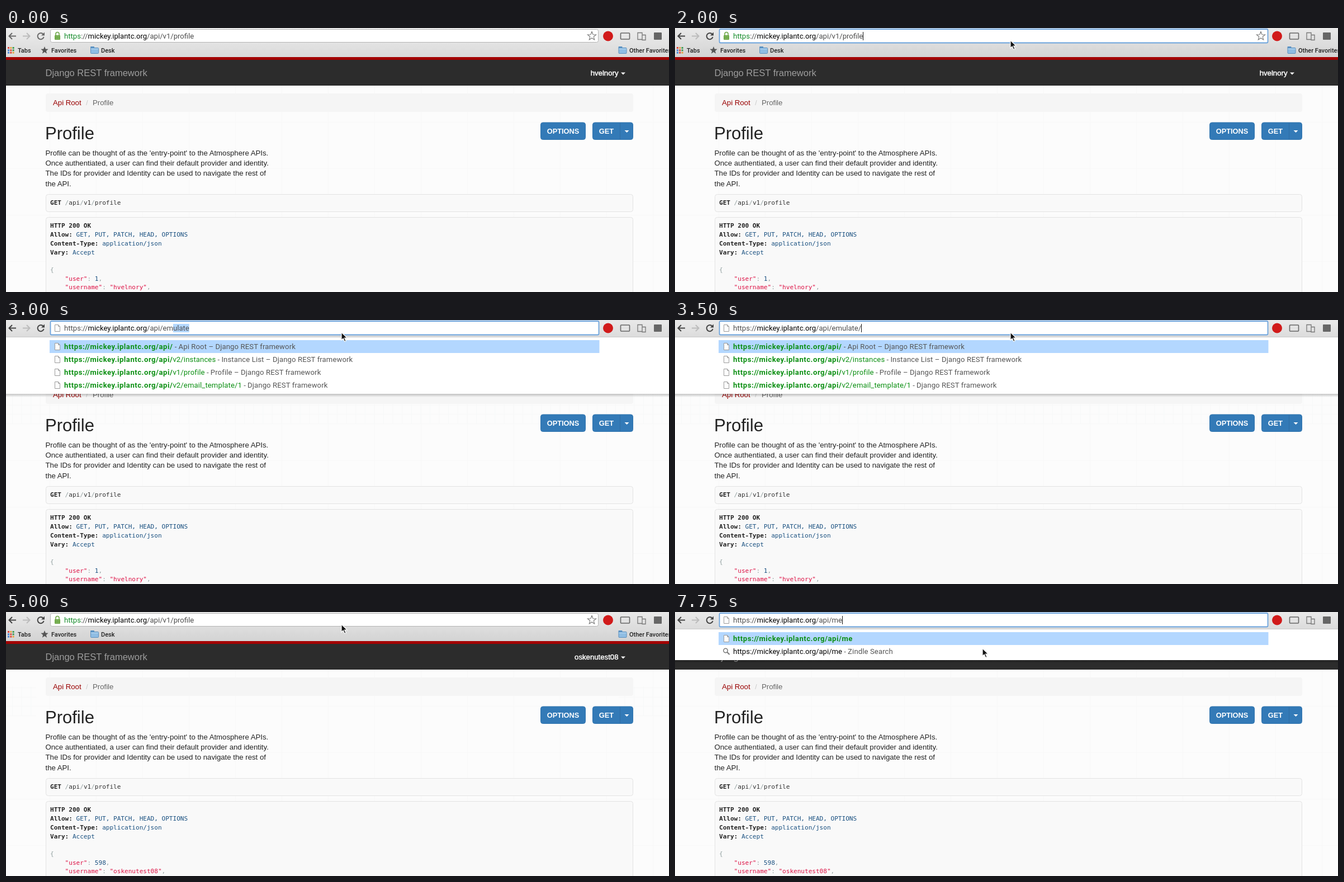
Write an HTML page that moves like this. It is 1186x472 px and loops after 8000 ms.

```html
<!DOCTYPE html>
<html lang="en">
<head>
<meta charset="utf-8">
<title>Profile</title>
<style>
html, body { margin: 0; width: 100%; height: 100%; overflow: hidden; background: #fcfcfc; }
svg { display: block; width: 1186px; height: 472px; }
text { white-space: pre; }
.page { font: 13.2px "Liberation Sans", Arial, sans-serif; }
.mono { font: 11.06px "DejaVu Sans Mono", monospace; }
.ui { font: 13.1px Roboto, sans-serif; }
.mark { font: 500 11px Roboto, sans-serif; }
.b { font-weight: 700; }
.ui .b { letter-spacing: .53px; }
.ui .note { letter-spacing: .12px; }
</style>
</head>
<body>
<svg id="stage" viewBox="0 0 1186 472"></svg>
<script>
const LOOP = 8000;
const SITE = 'https://mickey.iplantc.org';
const DRF = 'Django REST framework';
const NAME = 'oskenutest08';
const INK = '#222', BLUE = '#195080', RED = '#d14', PICK = '#b3d7ff';
const stage = document.getElementById('stage');
const ruler = document.createElement('canvas').getContext('2d');

// Drawing helpers
const rect = (x, y, w, h, fill, more = '') =>
  `<rect x="${x}" y="${y}" width="${w}" height="${h}" fill="${fill}" ${more}/>`;
const line = (d, color, width = 1, fill = 'none') =>
  `<path d="${d}" stroke="${color}" stroke-width="${width}" fill="${fill}"/>`;
const shape = (d, fill) => `<path d="${d}" fill="${fill}"/>`;
const span = (str, color, cls = '') => `<tspan fill="${color}" class="${cls}">${str}</tspan>`;
const text = (x, y, body, cls, fill = INK, more = '') =>
  `<text x="${x}" y="${y}" class="${cls}" fill="${fill}" ${more}>${body}</text>`;

function widthOf(str) {
  ruler.font = '13.1px Roboto, sans-serif';
  return ruler.measureText(str).width;
}

function star(cx, cy, r) {
  const pts = Array.from({ length: 10 }, (_, i) => {
    const a = i * Math.PI / 5 - Math.PI / 2, q = i % 2 ? r * .43 : r;
    return (cx + q * Math.cos(a)).toFixed(2) + ' ' + (cy + q * Math.sin(a)).toFixed(2);
  });
  return 'M' + pts.join('L') + 'Z';
}

// Suggestion rows: [bold path, plain path, description]
const apiRows = [
  ['/api/', '', 'Api Root – ' + DRF],
  ['/api/', 'v2/instances', 'Instance List – ' + DRF],
  ['/api/', 'v1/profile', 'Profile – ' + DRF],
  ['/api/', 'v2/email_template/1', DRF]
];
const longRows = [...apiRows,
  ['/api/', 'v2/identities', 'Identity List – ' + DRF],
  ['/api/', 'v2/providers', 'Provider List – ' + DRF]
];
const searchRow = path => [path, null, 'Zindle Search'];
const nameRows = n => {
  const typed = '/api/emulate/' + NAME.slice(0, n);
  return [[typed, NAME.slice(n), 'Profile – ' + DRF], searchRow(typed)];
};
const plainRows = path => [[path, '', ''], searchRow(path)];

const typing = (path, done, rows) =>
  ({ path: path + done, sel: done ? SITE.length + path.length : null, rows, secure: false, focus: true });

// Each step changes part of the state
const steps = [
  [0, { id: 1, user: 'hvelnory', path: '/api/v1/profile', secure: true, focus: false,
        active: false, busy: false, sel: null, rows: [], mouse: null, beam: false, fine: 0 }],
  [250, { active: true, mouse: [1120, 30] }],
  [500, { mouse: [900, 27] }],
  [750, { mouse: [700, 14], beam: true }],
  [1000, { mouse: [575, 14] }],
  [1250, { focus: true, sel: 0 }],
  [1500, { mouse: [585, 15] }],
  [1750, { sel: null, mouse: [594, 17] }],
  [2000, { mouse: [600, 22], beam: false }],
  [2500, { ...typing('/api/', '', longRows), fine: 1 }],
  [2750, typing('/api/e', 'mulate', apiRows)],
  [3000, typing('/api/em', 'ulate', apiRows)],
  [3250, typing('/api/emul', 'ate', apiRows)],
  [3500, typing('/api/emulate/', '', apiRows)],
  [3750, typing('/api/emulate/' + NAME[0], NAME.slice(1), nameRows(1))],
  [4000, typing('/api/emulate/' + NAME.slice(0, 3), NAME.slice(3), nameRows(3))],
  [4250, { path: '/api/emulate/' + NAME, sel: null, rows: [], focus: false, busy: true }],
  [5000, { id: 598, user: NAME, path: '/api/v1/profile', secure: true, busy: false, fine: 2 }],
  [5500, { mouse: [520, 20] }],
  [5750, { mouse: [420, 15], beam: true }],
  [6000, { mouse: [330, 14] }],
  [6250, { mouse: [264, 14] }],
  [6500, { mouse: [281, 14] }],
  [6750, { mouse: [420, 15], focus: true, sel: SITE.length + 5 }],
  [7000, { mouse: [550, 65], beam: false }],
  [7500, { ...typing('/api/m', '', plainRows('/api/m')), fine: 0 }],
  [7750, typing('/api/me', '', plainRows('/api/me'))]
];

function backdrop(s) {
  let big = '', small = '';
  for (let x = 78; x < 1186; x += 83) big += `M${x + .5} 103V472`;
  for (let y = 168; y < 472; y += 83) big += `M0 ${y + .5}H1186`;
  let out = rect(0, 0, 1186, 472, '#fcfcfc') + line(big, '#f8f8f8');
  if (s.fine) {
    for (let x = 11.5; x < 1186; x += 16.6)
      if (s.fine === 1 || x < 54 || x > 1096) small += `M${x.toFixed(1)} 133V186`;
    for (let y = 135.5; y < 186; y += 16.6)
      small += s.fine === 1 ? `M0 ${y}H1186` : `M0 ${y}H54M1096 ${y}H1186`;
    out += line(small, '#f7f8f8');
  }
  return out;
}

function page(s) {
  const intro = [
    "Profile can be thought of as the 'entry-point' to the Atmosphere APIs.",
    'Once authentiated, a user can find their default provider and identity.',
    'The IDs for provider and Identity can be used to navigate the rest of',
    'the API.'
  ];
  const head = [
    ['Allow:', 'GET, PUT, PATCH, HEAD, OPTIONS'],
    ['Content-Type:', 'application/json'],
    ['Vary:', 'Accept']
  ];
  const soft = str => span(str, '#93a1a1');
  const box = (y, h) => rect(71.5, y + .5, 1050, h, '#f9f9f9', 'rx="4" stroke="#e3e3e3"');
  const button = (x, w) => rect(x + .5, 169, w, 30.5, '#337ab7', 'rx="4" stroke="#3174ae"');
  const caps = (x, str) => text(x, 189, str, 'page b', '#fff', 'text-anchor="middle" style="font-size:12.8px"');
  const field = (y, key, val) =>
    text(79, y, '    ' + span(`"${key}"`, RED) + soft(': ') + val + soft(','), 'mono');

  return rect(0, 52, 1186, 5, '#a30000') + rect(0, 57, 1186, 46, '#2c2c2c')
    + text(70.5, 85.5, DRF, 'page', '#9d9d9d', 'style="font-size:16.5px"')
    + text(1095.5, 85, s.user, 'page', '#fff', 'text-anchor="end" stroke="#fff" stroke-width=".45"')
    + shape('M1100 79.500h8l-4 4z', '#fff')
    + rect(71, 117, 1051, 33, '#f5f5f5', 'rx="4"')
    + text(84, 138, 'Api Root', 'page', '#900') + text(143, 138, '/', 'page', '#ccc')
    + text(155, 138, 'Profile', 'page', '#666')
    + text(70, 198.5, 'Profile', 'page', INK, 'style="font-size:31px"')
    + button(956, 80) + caps(996.5, 'OPTIONS')
    + button(1049, 72) + caps(1074, 'GET')
    + line('M1098.500 170V199', '#2e6da4') + shape('M1106.500 183h8l-4 4z', '#fff')
    + intro.map((str, i) => text(70.5, 227.6 + i * 18.4, str, 'page')).join('')
    + box(297, 31)
    + text(79, 316, span('GET ', INK, 'b')
      + ['api', 'v1', 'profile'].map(w => soft('/') + span(w, '#333')).join(''), 'mono')
    + box(338, 200)
    + text(79, 357, 'HTTP 200 OK', 'mono b')
    + head.map(([k, v], i) =>
      text(79, 373 + i * 15.8, span(k, INK, 'b') + ' ' + span(v, BLUE), 'mono')).join('')
    + text(79, 436, soft('{'), 'mono')
    + field(451.7, 'user', span(s.id, BLUE))
    + field(467.3, 'username', span(`"${s.user}"`, RED));
}

const folder = x => rect(x, 33, 7, 4, '#5b93c4', 'rx="1"')
  + rect(x + .5, 35.5, 14, 10, '#8fbde3', 'rx="1" stroke="#5b8fbd"')
  + line(`M${x + 1} 37.500h13`, '#b9d8f0');
const sheet = y => line(`M87.500 ${y - 6}h6l3 3v9h-9zM93.500 ${y - 6}v3h3`, '#9a9a9a', 1, '#fff');

function toolbar(s) {
  const ink = s.active ? '#444' : '#6a6a6a';
  const [top, low] = s.active ? ['#e9e9e9', '#d3d3d3'] : ['#ececec', '#dadada'];
  const dots = ['#e0443a', '#e8a33d', '#3d9b50', '#4a86d8'];
  let out = `<linearGradient id="bar" x2="0" y2="1"><stop stop-color="${top}"/><stop offset="1" stop-color="${low}"/></linearGradient>`
    + rect(0, 0, 1186, 52, 'url(#bar)')
    + line('M18 14.500H6M11 9L5.500 14.500L11 20', ink, 2)
    + line('M30 14.500H42M37 9L42.500 14.500L37 20', '#bcbcbc', 2);

  out += s.busy
    ? line('M57.500 10L67 19.500M67 10L57.500 19.500', ink, 2)
    : line('M66.500 11A5.600 5.600 0 1 0 67.600 16', ink, 2) + shape('M69 7.500v6h-6z', ink);

  out += s.focus
    ? rect(79.5, 2, 981, 24.5, '#fff', 'rx="2" stroke="#6ca3dc" stroke-width="1.800"')
    : rect(79.5, 2.5, 980, 23, '#fff', 'rx="3" stroke="#b4b4b4"');

  // Extension icons
  out += '<circle cx="1077" cy="14.500" r="9" fill="#d11a1a"/>'
    + rect(1099.5, 9, 16, 11, 'none', 'rx="1" stroke="#666" stroke-width="1.600"')
    + line('M1130 8.500h8v12h-8zM1138 12.500h6v9h-6z', '#777', 1.3)
    + rect(1159, 8, 14, 13, '#666', 'rx="1"');

  // Bookmark row
  for (let i = 0; i < 9; i++)
    out += rect(3 + i % 3 * 4.3, 34 + Math.floor(i / 3) * 4.3, 3, 3, dots[(i + (i > 4)) % 4]);
  return out + text(21, 43.5, 'Tabs', 'mark')
    + shape(star(69, 40, 7), '#555') + text(81, 43.5, 'Favorites', 'mark')
    + folder(151) + text(170, 43.5, 'Desk', 'mark')
    + folder(1095.5) + text(1115, 43.5, 'Other Favorites', 'mark');
}

function address(s) {
  const full = SITE + s.path;
  const end = 104 + widthOf(full);
  let out = '';
  if (s.sel !== null) {
    const x = 104 + widthOf(full.slice(0, s.sel));
    out += rect(x, 7, end - x, 15, PICK);
  }
  out += s.secure
    ? rect(87, 13, 10, 8, '#6ba644', 'rx="1"') + line('M89 13v-2.500a3 3 0 0 1 6 0V13', '#6ba644', 1.6)
      + line('M88 15.500h8M88 18.500h8', '#94c476', .8)
      + line(star(1048, 14.5, 8), '#777', 1.1, '#fff')
    : sheet(14.5);
  out += text(104, 19, span('https', s.secure ? '#128a28' : '#4d4d4d') + span('://', '#4d4d4d')
    + span(SITE.slice(8), '#000') + span(s.path, '#4d4d4d'), 'ui');
  if (s.focus && s.sel === null) out += rect(Math.round(end), 7, 1, 15, '#111');
  return out;
}

function dropdown(rows) {
  if (!rows.length) return '';
  const bottom = 40 + rows.length * 23;
  let out = '<linearGradient id="fade" x2="0" y2="1"><stop stop-opacity=".22"/><stop offset="1" stop-opacity="0"/></linearGradient>'
    + rect(0, bottom, 1186, 6, 'url(#fade)') + rect(0, 31, 1186, bottom - 31, '#fff')
    + rect(0, 30, 1186, 1, '#c8c8c8') + rect(78, 36, 983.5, 23, PICK);
  rows.forEach(([typed, rest, note], i) => {
    const y = 47.5 + i * 23, search = rest === null;
    const tail = note ? span('  - ', '#555', 'dash').replace('  - ', ' - ') + span(note, '#555', 'note') : '';
    out += search
      ? `<circle cx="90.500" cy="${y - 1.5}" r="3.700" fill="none" stroke="#777" stroke-width="1.500"/>`
        + line(`M93 ${y + 1}l4.500 4.500`, '#777', 2)
      : sheet(y);
    out += text(104, y + 4.5, (search
      ? span(SITE + typed, '#000')
      : span(SITE + typed, '#0b8f12', 'b') + span(rest, '#0b8f12', 'note')) + tail, 'ui');
  });
  return out;
}

function pointer(s) {
  if (!s.mouse) return '';
  const [x, y] = s.mouse;
  return s.beam
    ? line(`M${x - 3} ${y - 7}q3 0 3 2v10q0 2 3 2M${x + 3} ${y - 7}q-3 0 -3 2v10q0 2 -3 2`, '#222', 1.2)
    : line(`M${x} ${y}v14l3.200 -3l2.500 5.500l2.400 -1l-2.500 -5.300h4.600z`, '#fff', 1.2, '#111');
}

const start = performance.now();
let shown = -1;

function draw() {
  const t = (performance.now() - start) % LOOP;
  const n = steps.filter(([at]) => at <= t).length;
  if (n !== shown) {
    shown = n;
    const s = Object.assign({}, ...steps.slice(0, n).map(step => step[1]));
    stage.innerHTML = backdrop(s) + page(s) + toolbar(s) + address(s) + dropdown(s.rows) + pointer(s);
  }
  requestAnimationFrame(draw);
}
draw();
</script>
</body>
</html>
```
